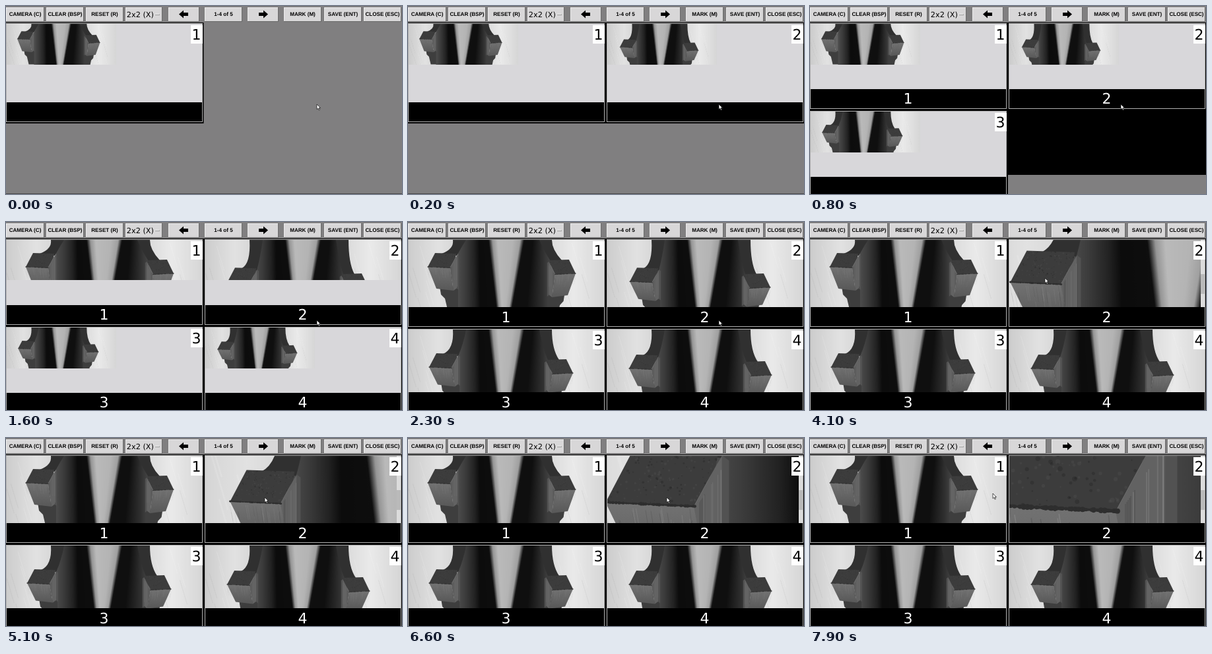
Recreate the animation shown at these times as an HTML page with a canvas. Size 600 px wide and 285 px high, loop 8 s.

```html
<!DOCTYPE html>
<html lang="en">
<head>
<meta charset="utf-8">
<title>Camera grid viewer</title>
<style>
html, body { margin: 0; width: 600px; height: 285px; overflow: hidden; background: #807f80; }
canvas, svg { position: absolute; left: 0; top: 0; width: 600px; height: 285px; display: block; }
text { text-rendering: geometricPrecision; }
.btn { font: bold 8.1px "Liberation Sans", Arial, sans-serif; text-anchor: middle; }
.menu { font: 11.3px "DejaVu Sans", sans-serif; }
.num { font: 22px "DejaVu Sans", sans-serif; text-anchor: middle; }
</style>
</head>
<body>
<canvas id="view" width="600" height="285"></canvas>
<svg id="ui" viewBox="0 0 600 285"></svg>
<script>
const LOOP = 8000, STEP = 100;
const W = 297, H = 111, SMALL = 0.559;
const PAPER = '#d8d7da', DESK = '#807f80';
const ctx = document.getElementById('view').getContext('2d');
const ui = document.getElementById('ui');

// ---------- interface ----------
function add(tag, attrs, text) {
  const el = document.createElementNS('http://www.w3.org/2000/svg', tag);
  for (const k in attrs) el.setAttribute(k, attrs[k]);
  if (text) el.textContent = text;
  return ui.appendChild(el);
}

function button(x, w, label) {
  add('rect', { x, y: 2, width: w, height: 22, fill: '#6a6a6a' });
  add('rect', { x, y: 2, width: w - 1, height: 21, fill: '#ececec' });
  add('rect', { x: x + 1, y: 3, width: w - 2, height: 20, fill: '#d8d7d8' });
  if (label) add('text', { x: x + w / 2, y: 15.4, class: 'btn' }, label);
}

[[0, 58, 'CAMERA (C)'], [61, 57, 'CLEAR (BSP)'], [121, 57, 'RESET (R)'],
 [181, 56], [246, 47], [301, 57, '1-4 of 5'], [366, 47],
 [421, 57, 'MARK (M)'], [482, 57, 'SAVE (ENT)'], [542, 57, 'CLOSE (ESC)']]
  .forEach(b => button(...b));
add('text', { x: 182.8, y: 16.6, class: 'menu' }, '2x2 (X)');
add('rect', { x: 226, y: 12, width: 7, height: 2, fill: '#999' });
add('rect', { x: 226, y: 12, width: 6.5, height: 1, fill: '#eee' });
const ARROW = 'M0 0L7-6V-2.6H14V2.6H7V6Z';
add('path', { d: ARROW, transform: 'translate(262 12.5)' });
add('path', { d: ARROW, transform: 'translate(397 12.5) scale(-1 1)' });

const tags = [1, 2, 3, 4].map(n => ({
  box: add('rect', { width: 18, height: 28, fill: '#fff' }),
  num: add('text', { class: 'num' }, String(n)),
  label: add('text', { class: 'num', fill: '#fff' }, String(n))
}));
const pointer = add('path', {
  d: 'M0 0V7.6L1.8 6L3.1 9L4.4 8.4L3.1 5.6H5.5Z',
  fill: '#fff', stroke: '#111', 'stroke-width': 0.7
});

function place(el, show, x, y) {
  el.style.display = show ? '' : 'none';
  el.setAttribute('x', x);
  el.setAttribute('y', y);
}

// ---------- camera picture ----------
function random(seed) {
  return () => (seed = (seed * 16807) % 2147483647) / 2147483647;
}

function backdrop() {
  const k = 4, c = document.createElement('canvas');
  c.width = W * k;
  c.height = H * k;
  const g = c.getContext('2d');
  for (let y = 0; y < H * k; y++) {
    const t = y / (H * k), row = g.createLinearGradient(0, 0, W * k, 0);
    [[0, 205], [45, 226], [73, 214], [75, 76], [86, 60], [99 + 2 * t, 34], [107 + 2 * t, 12],
     [121 + 13 * t, 14], [127 + 11 * t, 150], [135 + 7 * t, 186], [158 - 12 * t, 180],
     [169 - 18 * t, 160], [175 - 20 * t, 16], [188 - 10 * t, 15], [203, 48], [214, 68],
     [216, 220], [250, 234], [297, 214]]
      .forEach(([x, v]) => row.addColorStop(x / W, `rgb(${v},${v},${v})`));
    g.fillStyle = row;
    g.fillRect(0, y, W * k, 1);
  }
  // faint streaks on the bright side walls
  const rnd = random(11);
  g.lineWidth = 5;
  for (let i = 0; i < 16; i++) {
    const x = (i % 2 ? 225 + rnd() * 72 : rnd() * 45) * k, y = rnd() * H * k;
    g.strokeStyle = i % 3 ? 'rgba(255,255,255,.12)' : 'rgba(90,90,90,.06)';
    g.beginPath();
    g.moveTo(x, y);
    g.lineTo(x + 45, y + 150);
    g.stroke();
  }
  return c;
}
const back = backdrop();

function poly(fill, ...pts) {
  ctx.beginPath();
  pts.forEach(([x, y]) => ctx.lineTo(x, y));
  ctx.closePath();
  ctx.fillStyle = fill;
  ctx.fill();
}

function arm(a, b, c, d, e, f) {
  ctx.beginPath();
  ctx.moveTo(a, 0);
  ctx.quadraticCurveTo(...b, ...c);
  ctx.lineTo(...d);
  ctx.quadraticCurveTo(...e, f, 0);
  ctx.fillStyle = '#303030';
  ctx.fill();
}

// Block with its outer front corner at x, y; sx < 0 mirrors it.
function block(x, y, sx, tall) {
  const rnd = random(77);
  ctx.save();
  ctx.translate(x, y);
  ctx.scale(sx, 1);
  const low = 28 * tall;
  poly('#3e3e3e', [18, low - 3], [46, low - 3], [46, low + 36], [31, low + 36], [26, low + 15], [20, low + 9]);
  const face = ctx.createLinearGradient(0, 0, 0, low);
  face.addColorStop(0, '#727272');
  face.addColorStop(1, '#5a5a5a');
  poly(face, [0, 0], [34, 1.5], [39, low + 3], [13, low]);
  poly('#626262', [33.6, 1.5], [42, -14], [44.5, -18], [44.5, low - 1], [39, low + 3]);
  poly('#525252', [44.3, -18], [47, -16], [47, low + 2], [44.3, low]);
  ctx.lineWidth = 0.25;
  for (let i = 0; i < 28; i++) {
    const u = rnd() * 33, v = 2 + rnd() * 8;
    ctx.strokeStyle = i % 2 ? 'rgba(255,255,255,.1)' : 'rgba(0,0,0,.12)';
    ctx.beginPath();
    ctx.moveTo(u, v);
    ctx.lineTo(u + 2 - u / 40, v + 10);
    if (i < 12) {
      const s = 35 + rnd() * 9;
      ctx.moveTo(s, 1 - (s - 35) * 1.5);
      ctx.lineTo(s, 20);
    }
    ctx.stroke();
  }
  poly('#3c3c3c', [0, 0], [11, -21], [43, -20], [42, -14], [33.6, 1.5]);
  ctx.save();
  ctx.clip();
  for (let i = 0; i < 220; i++) {
    ctx.fillStyle = i % 2 ? 'rgba(20,20,20,.22)' : 'rgba(120,120,120,.13)';
    ctx.beginPath();
    ctx.arc(rnd() * 43, 2 - rnd() * 23, 0.15 + rnd() * 0.4, 0, 7);
    ctx.fill();
  }
  ctx.restore();
  ctx.fillStyle = '#2e2e2e';
  for (let u = 0; u < 34; u += 0.4) {
    ctx.beginPath();
    ctx.arc(u, u * 0.045 - 0.1, 0.25 + rnd() * 0.4, 0, 7);
    ctx.fill();
  }
  ctx.restore();
}

const SHOTS = [
  [29, 41, 253, 51, 1.18],
  [34, 63.2, 247, 72, 0.95],
  [31, 57, 249, 66, 0.95],
  [33, 59, 249, 69, 0.95]
];

function picture(i, x, y, s, clipW, clipH) {
  const [lx, ly, rx, ry, tall] = SHOTS[i], o = origin(i);
  ctx.save();
  ctx.beginPath();
  ctx.rect(o.x, o.y, clipW, clipH);
  ctx.clip();
  ctx.translate(x, y);
  ctx.scale(s, s);
  ctx.drawImage(back, 0, 0, W, H);
  ctx.beginPath();
  ctx.rect(0, 0, W, H);
  ctx.clip();
  arm(67, [69, ly - 27], [lx + 21, ly - 20], [lx + 44, ly - 17], [83, ly - 35], 87);
  arm(198, [202, ry - 40], [rx - 37, ry - 17], [rx - 21, ry - 20], [217, ry - 36], 217);
  block(lx, ly, 1, tall);
  block(rx, ry, -0.92, tall);
  ctx.restore();
}

// ---------- timeline ----------
let now = 0;
const part = (a, b) => Math.min(1, Math.max(0, (now - a + STEP) / (b - a + STEP)));
const origin = i => ({ x: i % 2 ? 302 : 1, y: i < 2 ? 27 : now < 2000 ? 160 : 163 });

const SHOWN = [0, 200, 500, 900], LABELLED = [800, 800, 1000, 1100], FITTED = [1600, 1600, 1700, 1800];
const CLICKS = [5300, 6300, 6600, 6900, 7000, 7200];
const PATH = [[0, 471, 149], [2900, 425, 121], [3000, 367, 86], [3200, 356, 85]];

function zoomed() {
  const v = { x: 302, y: 27, s: 1 };
  const zoom = (cx, cy, f) => {
    v.x = cx + (v.x - cx) * f;
    v.y = cy + (v.y - cy) * f;
    v.s *= f;
  };
  zoom(368, 90, 1.3 ** part(3000, 3100));
  zoom(357, 89, 1.75 ** part(3500, 4100));
  v.x += 36 * part(4300, 5100);
  v.y += 5 * part(4300, 5100);
  zoom(393, 94, 1.205 ** CLICKS.filter(t => t <= now).length);
  return v;
}

function cell(i) {
  const { x, y } = origin(i), on = now >= SHOWN[i], tag = tags[i];
  const top = i > 1 ? (now < 2000 ? 259 : 258) : now < 500 ? 146 : now < 2000 ? 126 : 129;
  place(tag.box, on, x + 279, y + 2);
  place(tag.num, on, x + 287.5, y + 24);
  place(tag.label, now >= LABELLED[i], x + 147.5, i > 1 ? 281 : now < 2000 ? 148 : 152);
  if (!on) return;

  ctx.fillStyle = PAPER;
  ctx.fillRect(x, y, 296.5, top - y);
  if (now < FITTED[i]) picture(i, x, y, SMALL, 166, 62);
  else if (now < 2000) picture(i, x, y, 1, 296.5, 61);
  else if (i === 1 && now >= 3000) {
    const v = zoomed();
    ctx.fillStyle = '#dcdcdc';
    ctx.fillRect(592, y, 6.5, top - y);
    ctx.fillStyle = '#bababa';
    ctx.fillRect(592, 79, 6.5, 30);
    picture(i, v.x, v.y, v.s, 290, top - y);
  } else picture(i, x, y, 1, 296.5, top - y);

  ctx.fillStyle = '#000';
  ctx.fillRect(x - 1, top, 299, 31);
  ctx.strokeStyle = '#b0b0b0';
  ctx.lineWidth = 1;
  ctx.strokeRect(x - 0.5, y - 0.5, 297, top + 30 - y);
}

function draw() {
  ctx.fillStyle = DESK;
  ctx.fillRect(0, 0, 600, 285);
  ctx.fillStyle = '#000';
  if (now < 500) ctx.fillRect(0, 25, now < 100 ? 299.5 : 600, 153);
  else {
    ctx.fillRect(0, 25, 600, 132);
    ctx.fillRect(0, 157, 300, 128);
    if (now >= 800) ctx.fillRect(300, 157, 300, now < 900 ? 99 : 128);
  }
  if (now < 500) {
    ctx.fillStyle = '#4a4a4a';
    ctx.fillRect(0, 284, 600, 1);
  }
  for (let i = 0; i < 4; i++) cell(i);

  let [, px, py] = PATH.filter(p => p[0] <= now).pop();
  px += 36 * part(4300, 5100) - 115 * part(7800, 7900);
  py += 5 * part(4300, 5100) - 6 * part(7800, 7900);
  pointer.setAttribute('transform', `translate(${px} ${py})`);
}

let last = -1;
const start = performance.now();
function tick() {
  const t = Math.max(0, performance.now() - start) % LOOP;
  now = Math.floor(t / STEP) * STEP;
  if (now !== last) draw();
  last = now;
  requestAnimationFrame(tick);
}
tick();
</script>
</body>
</html>
```
